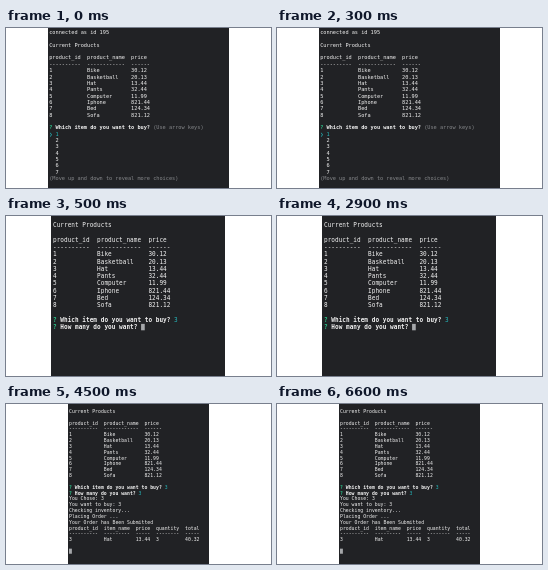
An HTML page with a canvas for the animation above (8000 ms loop, 265 by 160 pixels).

```html
<!DOCTYPE html>
<html lang="en">
<head>
<meta charset="utf-8">
<title>Terminal shop</title>
<style>
html, body { margin: 0; width: 100%; height: 100%; overflow: hidden; background: #fff; }
canvas { display: block; width: 100%; height: 100%; }
</style>
</head>
<body>
<canvas id="stage" width="265" height="160"></canvas>
<script>
const ctx = document.getElementById("stage").getContext("2d");
const LOOP = 8000;
const BACK = "#212225", WHITE = "#f1f1f1", DIM = "#85878a", GREEN = "#2bc58a", CYAN = "#25b5b8";
const FONT = "100px 'DejaVu Sans Mono', monospace";

const items = [
  ["Bike", "30.12"], ["Basketball", "20.13"], ["Hat", "13.44"], ["Pants", "32.44"],
  ["Computer", "11.99"], ["Iphone", "821.44"], ["Bed", "124.34"], ["Sofa", "821.12"]
];

const columns = (cells, widths) => cells.map((c, i) => c.padEnd(widths[i] + 2)).join("").trimEnd();

function table(heads, widths, rows) {
  const rules = widths.map(w => "-".repeat(w));
  return [heads, rules, ...rows].map(cells => columns(cells, widths));
}

const products = [
  "Current Products", "",
  ...table(["product_id", "product_name", "price"], [10, 12, 6],
    items.map(([name, price], i) => [String(i + 1), name, price])),
  ""
];

const order = table(
  ["product_id", "item_name", "price", "quantity", "total"], [10, 9, 5, 8, 5],
  [["3", "Hat", "13.44", "3", "40.32"]]
);

// A line is a string or a list of [text, colour, bold] parts.
const ask = (question, ...rest) => [["? ", GREEN, true], [question + " ", WHITE, true], ...rest];
const which = (...rest) => ask("Which item do you want to buy?", ...rest);
const many = (...rest) => ask("How many do you want?", ...rest);
const answer = ["3", CYAN];
const cursor = ["\u2588", "#a5a7aa"];

const scenes = [
  {
    start: 0, left: 42, right: 223, x: 43.2, y: 4.2, cell: 3.15, pitch: 6.35,
    lines: [
      "connected as id 195", "", ...products,
      which(["(Use arrow keys)", DIM]),
      [["\u276f 1", CYAN]],
      ...[2, 3, 4, 5, 6, 7].map(n => "  " + n),
      [["(Move up and down to reveal more choices)", DIM]]
    ]
  },
  {
    start: 500, left: 45, right: 219, x: 47, y: 8.8, cell: 3.67, pitch: 7.3,
    lines: [...products, which(answer), many(cursor)]
  },
  {
    start: 4500, left: 62, right: 203, x: 63, y: 7.2, cell: 2.9, pitch: 5.83,
    lines: [
      ...products, which(answer), many(answer),
      "You Chose: 3", "You want to buy: 3", "Checking inventory...", "Placing Order ...",
      "Your Order has Been Submitted", ...order, "", [cursor]
    ]
  }
];

function drawPart(scene, text, color, bold, x, y) {
  const { cell } = scene;
  ctx.fillStyle = color;
  if (text === cursor[0]) {
    ctx.fillRect(x, y - cell * 0.85, cell, cell * 1.75);
    return;
  }
  ctx.save();
  ctx.font = (bold ? "bold " : "") + FONT;
  const scale = cell / ctx.measureText("0").width;
  ctx.translate(x, y + cell * 0.6);
  ctx.scale(scale, scale);
  ctx.fillText(text, 0, 0);
  ctx.restore();
}

function draw(time) {
  const scene = scenes.filter(s => s.start <= time).pop();
  ctx.fillStyle = "#fff";
  ctx.fillRect(0, 0, 265, 160);
  ctx.fillStyle = BACK;
  ctx.fillRect(scene.left, 0, scene.right - scene.left, 160);
  scene.lines.forEach((line, row) => {
    const parts = typeof line === "string" ? [[line, WHITE]] : line;
    let column = 0;
    for (const [text, color, bold] of parts) {
      drawPart(scene, text, color, bold, scene.x + column * scene.cell, scene.y + row * scene.pitch);
      column += text.length;
    }
  });
}

const origin = performance.now();
function tick() {
  draw((performance.now() - origin) % LOOP);
  requestAnimationFrame(tick);
}
tick();
</script>
</body>
</html>
```
